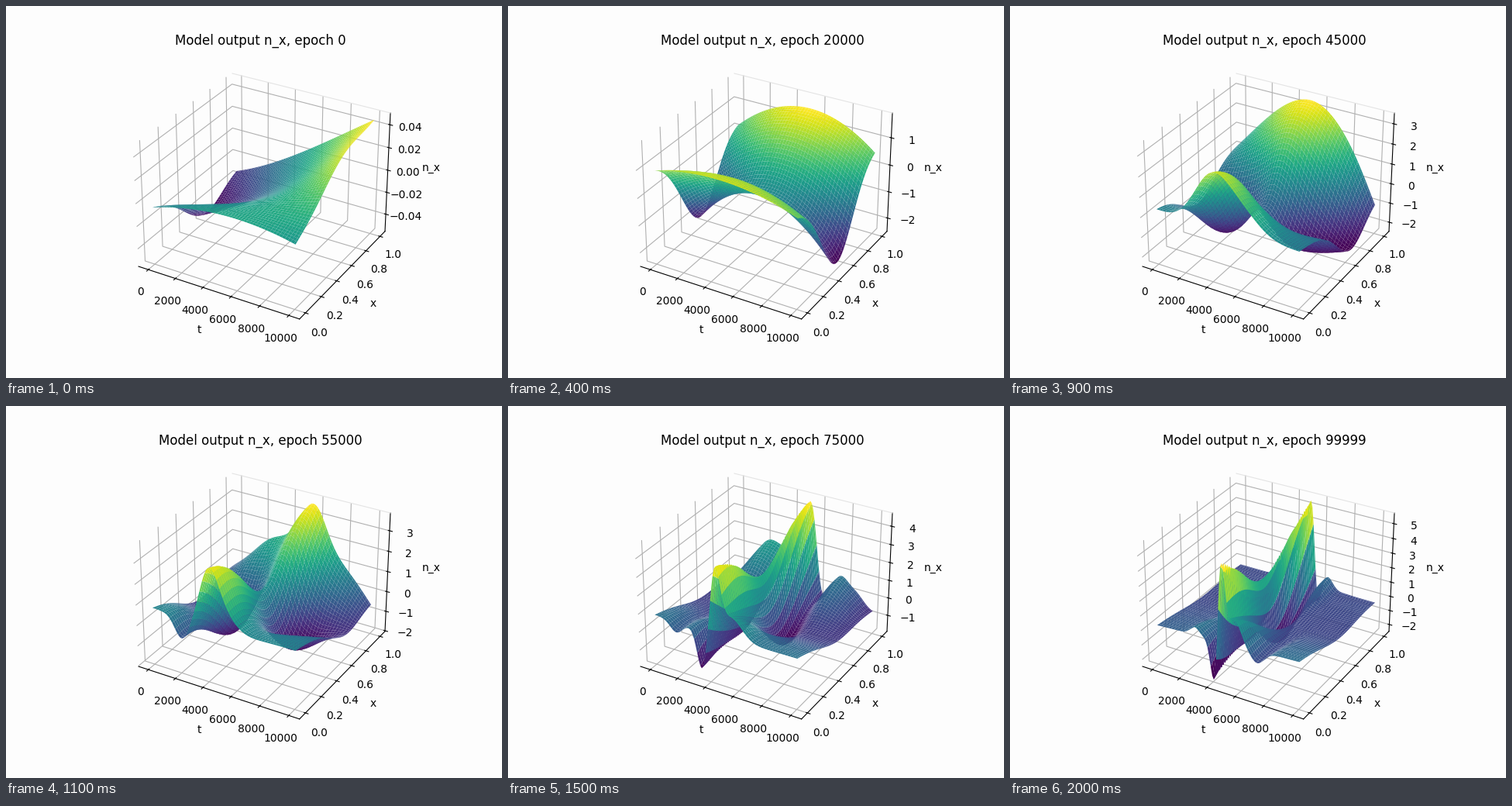
Write a matplotlib script that moves like this. It is 640 px wide and 480 px high and loops after 2100 ms.

```python
import numpy as np
import matplotlib.pyplot as plt
from matplotlib.animation import FuncAnimation
from matplotlib.lines import Line2D

W, H, DPI = 640, 480, 100
FRAMES, INTERVAL = 21, 100
PAPER = "#fdfdfd"

t, x = np.meshgrid(np.linspace(0, 1, 100), np.linspace(0, 1, 100))


def g(s, centre, width):
    return np.exp(-((s - centre) / width) ** 2)


def fold(front, trough, back, mid=0.5, width=0.28, skew=0.0):
    """Blend three profiles along t: at x = 0, x = mid and x = 1."""
    s = t - skew * (x - 0.5) * 4 * t * (1 - t)
    f, m, b = front(s), trough(s), back(s)
    base = f * (1 - x) + b * x
    return base - (f * (1 - mid) + b * mid - m) * g(x, mid, width)


def stage(epoch, lo, hi, *profiles, **shape):
    """Heights run from about -0.55 to 0.55 inside the limits lo..hi."""
    h = fold(*profiles, **shape)
    return epoch, lo, hi, lo + (0.5 + h / 1.1458) * (hi - lo)


stages = [
    stage(0, -0.0559, 0.0501,
          lambda s: -0.01 + 0.45 * s - 0.41 * s**2,
          lambda s: -0.49 + 0.7 * s + 0.24 * s**2,
          lambda s: -0.265 + 0.5 * s + 0.5 * s**2 - 0.235 * s**3,
          mid=0.58, width=0.33),
    stage(10000, -1.603, 1.463,
          lambda s: 0.52 - 0.56 * s * (1 - s),
          lambda s: -0.47 + 1.115 * s - 1.19 * s**2,
          lambda s: 0.2 + 0.9 * s - 0.59 * s**2,
          mid=0.51, width=0.29),
    stage(30000, -3.42, 2.32,
          lambda s: 0.267 + 0.85 * s - 0.92 * s**2,
          lambda s: -0.47 + 2.1 * s - 2.12 * s**2,
          lambda s: 0.16 + 1.4 * s - 1.43 * s**2,
          mid=0.51, width=0.29),
    stage(45000, -2.475, 3.53,
          lambda s: -0.03 + 0.51 * g(s, 0.465, 0.2) + 0.12 * g(s, 0.69, 0.15),
          lambda s: -0.5 + 0.2 * g(s, 0, 0.12) + 0.33 * g(s, 0.48, 0.14),
          lambda s: -0.04 - 0.17 * s + 0.69 * np.sin(np.pi * s),
          mid=0.47 + 0.2 * t**4, width=0.27, skew=0.1),
    stage(55000, -2.03, 3.85,
          lambda s: (-0.02 - 0.2 * g(s, 0.25, 0.08) + 0.52 * g(s, 0.475, 0.1)
                     + 0.1 * g(s, 0.6, 0.1)),
          lambda s: (-0.3 - 0.03 * s - 0.18 * g(s, 0.28, 0.12)
                     + 0.34 * g(s, 0.49, 0.1) - 0.18 * g(s, 0.72, 0.16)),
          lambda s: (-0.25 + 0.45 * np.sin(np.pi * s) + 0.08 * g(s, 0.2, 0.12)
                     + 0.36 * g(s, 0.51, 0.13)),
          mid=0.5 + 0.15 * t**4, skew=0.13),
    stage(75000, -1.93, 4.72,
          lambda s: (-0.09 - 0.1 * g(s, 0.18, 0.07) - 0.38 * g(s, 0.38, 0.05)
                     + 0.57 * g(s, 0.49, 0.05) + 0.2 * g(s, 0.6, 0.1)),
          lambda s: (-0.28 - 0.02 * s - 0.18 * g(s, 0.36, 0.07)
                     + 0.46 * g(s, 0.48, 0.08) - 0.2 * g(s, 0.62, 0.09)),
          lambda s: (-0.36 + 0.42 * g(s, 0.2, 0.13) + 0.26 * g(s, 0.36, 0.1)
                     + 0.87 * g(s, 0.49, 0.07) - 0.1 * g(s, 0.58, 0.05)
                     + 0.25 * g(s, 0.72, 0.09) + 0.14 * g(s, 0.85, 0.1)),
          skew=0.1),
    stage(100000, -2.49, 5.71,
          lambda s: (-0.19 + 0.07 * s + 0.08 * g(s, 0.31, 0.05)
                     - 0.4 * g(s, 0.45, 0.035) + 0.72 * g(s, 0.515, 0.035)
                     + 0.25 * g(s, 0.6, 0.06) - 0.12 * g(s, 0.75, 0.06)),
          lambda s: (-0.27 - 0.2 * g(s, 0.43, 0.04)
                     + 0.45 * g(s, 0.49, 0.04) - 0.22 * g(s, 0.57, 0.05)),
          lambda s: (-0.26 + 0.2 * g(s, 0.34, 0.07) + 0.35 * g(s, 0.43, 0.06)
                     + 0.65 * g(s, 0.485, 0.035) - 0.2 * g(s, 0.55, 0.03)
                     + 0.14 * g(s, 0.61, 0.06)),
          width=0.3, skew=0.09),
]


def surface_at(epoch):
    for a, b in zip(stages, stages[1:]):
        if epoch <= b[0]:
            k = (epoch - a[0]) / (b[0] - a[0])
            return [p + (q - p) * k for p, q in zip(a[1:], b[1:])]


fig = plt.figure(figsize=(W / DPI, H / DPI), dpi=DPI, facecolor=PAPER)
ax = fig.add_subplot(projection="3d")

# faint rim along the top of the back wall
fig.add_artist(Line2D([292 / W, 496 / W], [1 - 87 / H, 1 - 138 / H],
                      color="#e4e4e4", lw=0.8))


def draw(i):
    epoch = min(5000 * i, 99999)
    lo, hi, z = surface_at(epoch)
    ax.clear()
    ax.set_facecolor(PAPER)
    for axis in (ax.xaxis, ax.yaxis, ax.zaxis):
        axis.set_pane_color(PAPER)
    ax.plot_surface(t * 10000, x, z, cmap="viridis")
    ax.set_zlim(lo, hi)
    ax.set_title(f"Model output n_x, epoch {epoch}")
    ax.set_xlabel("t")
    ax.set_ylabel("x")
    ax.set_zlabel("n_x")
    return []


anim = FuncAnimation(fig, draw, frames=FRAMES, interval=INTERVAL,
                     init_func=lambda: [], repeat=True, repeat_delay=0)
plt.show()
```
